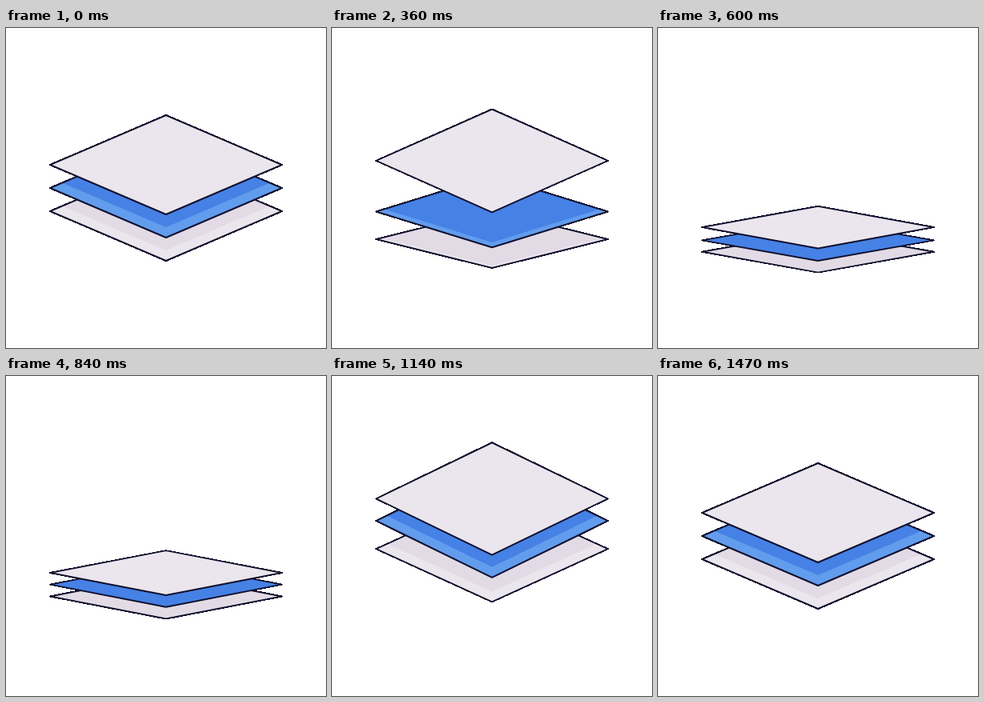
An HTML page with a canvas for the animation above (3500 ms loop, 400 by 400 pixels).

```html
<!DOCTYPE html>
<html lang="en">
<head>
<meta charset="utf-8">
<title>Layers</title>
<style>
  html, body { margin: 0; width: 100%; height: 100%; overflow: hidden; background: #fff; }
  canvas { display: block; width: 100vw; height: 100vh; }
</style>
</head>
<body>
<canvas id="stage"></canvas>
<script>
const SIZE = 400, LOOP = 3500, STEP = 30;
const MID_X = 200, HALF_W = 145;
const INK = '#11112f';

// Half height of a sheet in each pose: rest, raised, pressed, settled, raised, rest
const HALF_H = [62, 70.8, 25.2, 28.4, 70.8, 62];

// Bottom to top; y is the centre in each pose, at is when the pose is reached
const SHEETS = [
  { fill: '#ebe6ed', shade: '#e2dbe5',
    y: [229, 209, 281, 275, 209, 229], at: [0, 108, 476, 908, 1200, 1470] },
  { fill: '#629ced', shade: '#4681e5',
    y: [200, 181, 266, 260, 181, 200], at: [0, 168, 519, 920, 1142, 1417] },
  { fill: '#ebe6ed',
    y: [171, 152, 251.5, 245.2, 152, 171], at: [0, 276, 633, 903, 1095, 1365] }
];

const canvas = document.getElementById('stage');
const ctx = canvas.getContext('2d', { willReadFrequently: true });

function resize() {
  const dpr = window.devicePixelRatio || 1;
  canvas.width = Math.round(innerWidth * dpr);
  canvas.height = Math.round(innerHeight * dpr);
}

const ease = s => s * s * (3 - 2 * s);
const mix = (a, b, k) => a + (b - a) * k;

function pose(sheet, t) {
  const { y, at } = sheet;
  const last = at.length - 1;
  if (t >= at[last]) return { y: y[last], h: HALF_H[last] };
  const i = at.findIndex(end => t < end) - 1;
  const k = ease((t - at[i]) / (at[i + 1] - at[i]));
  return { y: mix(y[i], y[i + 1], k), h: mix(HALF_H[i], HALF_H[i + 1], k) };
}

function diamond(y, h) {
  ctx.beginPath();
  ctx.moveTo(MID_X, y - h);
  ctx.lineTo(MID_X + HALF_W, y);
  ctx.lineTo(MID_X, y + h);
  ctx.lineTo(MID_X - HALF_W, y);
  ctx.closePath();
}

function drawSheet(sheet, t) {
  const { y, h } = pose(sheet, t);
  diamond(y, h);
  ctx.fillStyle = sheet.fill;
  ctx.fill();
  if (sheet.shade) {
    // The shade slides off the front edge as the stack opens
    const shift = Math.min(13, Math.max(0, (h - 28.4) * 0.387));
    ctx.save();
    ctx.clip();
    diamond(y - shift, h);
    ctx.fillStyle = sheet.shade;
    ctx.fill();
    ctx.restore();
    diamond(y, h);
  }
  ctx.stroke();
}

// Gives the silhouette a hard edge, while lines inside it stay smooth
function hardenEdge() {
  const image = ctx.getImageData(0, 0, canvas.width, canvas.height);
  const px = image.data;
  for (let i = 3; i < px.length; i += 4) px[i] = px[i] < 128 ? 0 : 255;
  ctx.putImageData(image, 0, 0);
}

function draw(t) {
  ctx.setTransform(canvas.width / SIZE, 0, 0, canvas.height / SIZE, 0, 0);
  ctx.clearRect(0, 0, SIZE, SIZE);
  ctx.strokeStyle = INK;
  ctx.lineWidth = 2;
  ctx.lineJoin = 'round';
  SHEETS.forEach(sheet => drawSheet(sheet, t));
  hardenEdge();
}

const start = performance.now();

function tick() {
  const t = (performance.now() - start) % LOOP;
  draw(Math.floor(t / STEP) * STEP);
  requestAnimationFrame(tick);
}

addEventListener('resize', resize);
resize();
tick();
</script>
</body>
</html>
```
